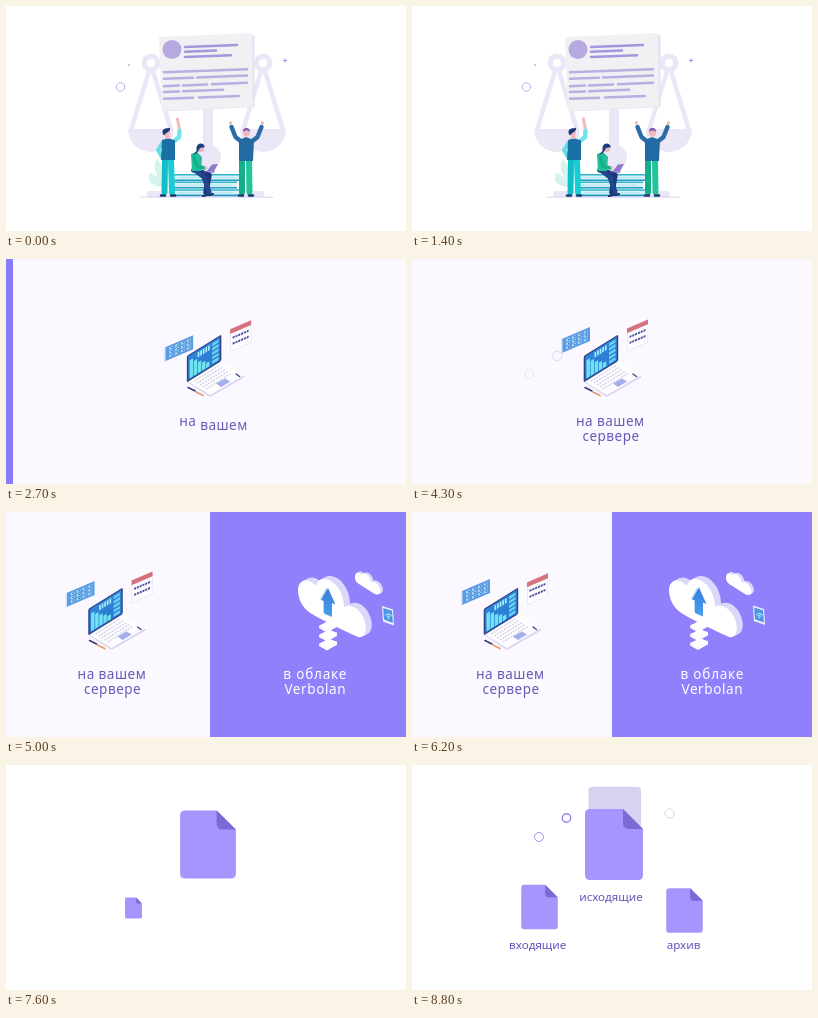
An HTML page with a canvas that plays this animation: 400x225 px, repeating every 8.9 s.

```html
<!DOCTYPE html>
<html lang="ru">
<head>
<meta charset="utf-8">
<title>Документы</title>
<style>
html, body { margin: 0; width: 100%; height: 100%; overflow: hidden; background: #fff; }
canvas { display: block; width: 100vw; height: 100vh; }
</style>
</head>
<body>
<canvas id="stage"></canvas>
<script>
const W = 400, H = 225, LOOP = 8900, STEP = 100;
const canvas = document.getElementById('stage');
const ctx = canvas.getContext('2d');
const FONT = '"Noto Sans", "Open Sans", sans-serif';

const seg = (t, a, b) => Math.min(1, Math.max(0, (t - a) / (b - a)));
const easeInOut = p => p < .5 ? 2 * p * p : 1 - 2 * (1 - p) ** 2;
const slide = (t, a, b) => easeInOut(seg(t, a, b));
const easeOut = p => 1 - (1 - p) ** 3;
const backOut = p => 1 + 2.4 * (p - 1) ** 3 + 1.4 * (p - 1) ** 2;
const wave = (t, period) => Math.sin(t / period * Math.PI * 2);

function rect(x, y, w, h, color, r = 0) {
  ctx.fillStyle = color;
  ctx.beginPath();
  ctx.roundRect(x, y, w, h, r);
  ctx.fill();
}
function poly(color, ...p) {
  ctx.fillStyle = color;
  ctx.beginPath();
  for (let i = 0; i < p.length; i += 2) ctx.lineTo(p[i], p[i + 1]);
  ctx.closePath();
  ctx.fill();
}
function line(color, width, ...p) {
  ctx.strokeStyle = color;
  ctx.lineWidth = width;
  ctx.lineCap = ctx.lineJoin = 'round';
  ctx.beginPath();
  for (let i = 0; i < p.length; i += 2) ctx.lineTo(p[i], p[i + 1]);
  ctx.stroke();
}
function dashes(color, width, on, off, x0, y0, x1, y1) {
  ctx.strokeStyle = color;
  ctx.lineWidth = width;
  ctx.lineCap = 'butt';
  ctx.setLineDash([on, off]);
  ctx.beginPath();
  ctx.moveTo(x0, y0);
  ctx.lineTo(x1, y1);
  ctx.stroke();
  ctx.setLineDash([]);
}
function disc(x, y, r, color) {
  ctx.fillStyle = color;
  ctx.beginPath();
  ctx.arc(x, y, r, 0, 7);
  ctx.fill();
}
function ring(x, y, r, color, width = 1) {
  ctx.strokeStyle = color;
  ctx.lineWidth = width;
  ctx.beginPath();
  ctx.arc(x, y, r, 0, 7);
  ctx.stroke();
}
function shape(d, color) {
  ctx.fillStyle = color;
  ctx.fill(new Path2D(d));
}
function text(str, x, y, color, size, align = 'center', spacing = 0) {
  ctx.font = `${size}px ${FONT}`;
  ctx.letterSpacing = spacing + 'px';
  ctx.textAlign = align;
  ctx.fillStyle = color;
  ctx.fillText(str, x, y);
}
function at(x, y, draw, scale = 1) {
  ctx.save();
  ctx.translate(x, y);
  ctx.scale(scale, scale);
  draw();
  ctx.restore();
}
// Draws on a vertical plane whose horizontal axis climbs by the given slope.
function plane(x, y, slope, draw) {
  ctx.save();
  ctx.transform(1, slope, 0, 1, x, y);
  draw();
  ctx.restore();
}
function gradient(y0, y1, a, b) {
  const g = ctx.createLinearGradient(0, y0, 0, y1);
  g.addColorStop(0, a);
  g.addColorStop(1, b);
  return g;
}

// Scene 1: people under a large document
function drawScales() {
  const c = '#ebe7f7';
  line(c, 6, 145, 57, 257, 57);
  rect(197, 60, 10, 126, c);
  disc(203, 151, 12, c);
  rect(141, 185, 117, 6, c, 2);
  for (const x of [145, 257]) {
    line(c, 4.5, x - 20, 124, x - 1, 62);
    line(c, 4.5, x + 20, 124, x + 1, 62);
    disc(x, 57, 9.5, c);
    disc(x, 57, 4, '#fff');
    ctx.fillStyle = c;
    ctx.beginPath();
    ctx.arc(x, 123, 23, 0, Math.PI);
    ctx.fill();
  }
}
function drawSheet() {
  poly('#e5e0f4', 156, 31, 248.5, 29, 248.5, 101, 159, 105.5);
  poly('#f1f0f3', 153, 31, 246, 27, 247, 100.5, 156, 105);
  disc(166, 43.5, 9.5, '#b6a9e1');
  const row = (x0, x1, y, c = '#baafe3') => line(c, 2.5, x0 + 1, y, x1 - 1, y - (x1 - x0) * .036);
  row(178, 232, 41, '#a597dd');
  row(178, 211, 45.7, '#a597dd');
  row(178, 226, 51, '#a597dd');
  row(157, 242, 66.3);
  row(157, 188, 72.8); row(190, 242, 71.4);
  row(157, 174, 80.2); row(176, 202, 79.4); row(205, 242, 78.2);
  row(157, 174, 86); row(176, 218, 85.2);
  row(157, 188, 92.8); row(192, 234, 91.4);
}
function drawBooks() {
  shape('M156 181 C143 180 141 172 144 167 C148 168 152 171 154 174 C148 166 147 158 151 153 C157 158 160 170 158 181Z', '#d6f4ee');
  for (let i = 0; i < 3; i++) {
    const y = 168 + i * 7.6, x = [168, 165, 167][i];
    rect(x, y, 66, 6.8, '#d7f2f8', 1);
    rect(x, y, 66, 1.5, '#35b4cc');
    rect(x, y + 5.4, 66, 1.6, '#2499bd');
    line('#9eddea', .7, x + 5, y + 3.5, x + 60, y + 3.5);
  }
}
function drawLeftMan(k) {
  line('#12bdca', 6, 159, 155, 158.5, 186);
  line('#1accd4', 6, 165, 155, 166, 186);
  line('#183a74', 2.4, 155, 189.5, 159, 189.5);
  line('#183a74', 2.4, 165, 189.5, 169, 189.5);
  line('#62dfe6', 4, 157, 136, 152, 144, 156, 151);
  const lift = k * 3;
  line('#f3b8bb', 3, 173.5, 124 + lift, 171.5, 113 + lift);
  line('#70e4e8', 4.5, 167, 136, 173, 131 + lift / 2, 173.5, 125 + lift);
  poly('#1b70a6', 156, 134, 162, 132, 169, 134.5, 169, 154, 155, 154);
  rect(159.5, 128, 3.5, 5, '#f0b3b5');
  disc(160.5, 127, 3.3, '#f3b8bb');
  shape('M156.5 127 C156 121 162 123 164 121.5 C165 126 160 126 158 129.5Z', '#193a78');
}
function drawWoman(k) {
  line('#1b3679', 5.5, 188, 164, 203, 169, 200, 186);
  line('#24458d', 5, 189, 164, 198, 171, 203, 186);
  line('#183066', 2.2, 197, 190, 201, 189);
  line('#183066', 2.2, 203, 189, 207, 188);
  poly('#21bf99', 185, 148, 191, 146, 196, 151, 195, 165, 186, 165);
  disc(194.5, 142.5, 3.6, '#f0b3b5');
  shape('M190.5 143 C190 137 197 135 199 141 L194 142 C192 146 190 149 187 148 C190 146 191 145 190.5 143Z', '#1c3c83');
  line('#17ae8c', 3.4, 188, 151, 191, 160, 198, 162 + k * .8);
  disc(200, 162 + k * .8, 1.4, '#f0b3b5');
  poly('#8f78cd', 201, 165, 206, 158.5, 212, 158, 208, 165.5);
  line('#5f4fae', 1, 198, 166, 208, 166);
}
function drawRightMan(k) {
  line('#15ae88', 6, 236, 156, 236, 186);
  line('#22c49a', 6, 243, 156, 243.5, 186);
  line('#183a74', 2.4, 233, 189.5, 237, 189.5);
  line('#183a74', 2.4, 243, 189.5, 247, 189.5);
  const hand = 118 + k * 5, out = k * 3;
  for (const s of [-1, 1]) {
    const x = 240.5;
    disc(x + s * (16 + out), hand - 1, 1.7, '#f3b8bb');
    line('#2a6ba8', 4.4, x + s * 6, 135, x + s * (11 + out), 131 + k * 2, x + s * (15 + out), hand + 3);
  }
  poly('#246aa2', 233, 134, 240, 131, 248, 134, 247, 155, 233, 155);
  disc(240.5, 127, 3.5, '#f3b8bb');
  shape('M236.8 126 C237 120 244 121 244.3 126 C242 124 239 124 236.8 126Z', '#7d5fb4');
}
function peopleScene(t) {
  const k = (1 - Math.cos(t / 1400 * Math.PI * 2)) / 2;
  drawScales();
  at(0, k * 3, drawSheet);
  line('#cbc4e8', .7, 134, 191.2, 267, 191.2);
  drawBooks();
  drawLeftMan(k);
  drawWoman(k);
  drawRightMan(k);
  const drift = wave(t, 2800);
  ring(114.5 + Math.abs(drift), 81 - drift * 2, 4.2, '#a79be6', .8);
  disc(123, 59 + drift * 2, .8, '#8c7be0');
  const px = 279 + Math.abs(drift) * 3, py = 54.5 + drift;
  line('#8c7be0', .8, px - 1.7, py, px + 1.7, py);
  line('#8c7be0', .8, px, py - 1.7, px, py + 1.7);
}

// Scene 2: laptop
function drawLaptop() {
  poly('#d9d6ef', 172, 123, 206, 102, 229, 117, 229, 118.5, 196, 137.5, 194, 137.5);
  poly('#fdfcff', 172, 122, 206, 101, 228.5, 116.5, 195, 136);
  for (let i = 0; i < 5; i++) {
    const x = 179 + i * 3, y = 122 + i * 2;
    dashes('#cfcde2', 1.2, 2, 1, x, y, x + 25, y - 15.5);
  }
  poly('#a3aeea', 201, 124.5, 210, 119.5, 215, 122.5, 206, 128);
  plane(172, 97, -.62, () => {
    rect(-.3, -.3, 34.5, 26.5, '#2f4488', 1.5);
    rect(1.2, 1.2, 31.6, 23.6, gradient(0, 26, '#2f86d8', '#2b78d2'));
    [18, 15, 11, 8, 5].forEach((h, i) => rect(2.5 + i * 4.1, 24 - h, 3.4, h, '#6fe3f2'));
    for (let i = 0; i < 5; i++) rect(10.5 + i * 2.6, 3, 1.7, 5, '#a8effa');
    for (let i = 0; i < 5; i++) rect(25, 3 + i * 4.4, 6.5, 2.9, '#6bd0f2');
  });
  line('#343978', 1.6, 173, 128.5, 180, 132);
  line('#e99a68', 1.8, 181, 133, 188, 136.5);
  line('#3b4080', 1.3, 221, 115, 224.5, 117.5);
}
function drawGridCard() {
  plane(150, 80, -.43, () => {
    rect(-1, 0, 2, 14.5, '#d3e2fa');
    rect(.5, 0, 27.5, 14, '#5b9ae4');
    for (let row = 0; row < 3; row++) {
      dashes('#a3dcf7', 2.4, 4, 1.9, 4, 3.2 + row * 3.8, 26, 3.2 + row * 3.8);
      dashes('#2f66b6', 1.2, 1.5, 4.4, 6, 3.2 + row * 3.8, 26, 3.2 + row * 3.8);
    }
  });
}
function drawListCard() {
  plane(215, 69.5, -.43, () => {
    rect(0, 0, 21, 23, '#e6e3f4');
    rect(.7, 0, 19.7, 22.3, '#fdfcff');
    rect(0, 0, 21, 4.8, '#d4737f');
    for (const y of [9.5, 15.5]) dashes('#4d509e', 2.1, 2, .8, 2.5, y, 18.5, y);
  });
}
function laptopArt(t) {
  const rise = 16 * (1 - easeOut(seg(t, 2560, 3200)));
  drawLaptop();
  at(0, rise + wave(t - 4300, 2600), drawGridCard);
  at(0, rise * .15 - wave(t - 4300, 2800), drawListCard);
  ctx.globalAlpha = seg(t, 3800, 4200) * (1 - seg(t, 4500, 4900));
  ring(145, 97 - wave(t - 4300, 2400), 4.7, '#d9d5ee', .8);
  ring(117.5, 115 + wave(t - 4300, 2400), 4.5, '#e4e0f4', .8);
  ctx.globalAlpha = 1;
}
function risingWord(str, x, y, t, start, align = 'left') {
  const p = seg(t, start, start + 450);
  ctx.globalAlpha = Math.min(1, p * 3);
  text(str, x, y + 20 * (1 - easeOut(p)), '#6959b5', 13.5, align, .5);
  ctx.globalAlpha = 1;
}
function laptopText(t) {
  risingWord('на', 164, 167, t, 2320);
  risingWord('вашем', 185, 167, t, 2520);
  risingWord('сервере', 199, 182, t, 2720, 'center');
}

// Scene 3: cloud
const CLOUD = 'M57 78 C57 70 63 67 68 69 C71 70 73 72 75 74 C76 67 83 65 90 69 C98 74 103 84 103 95 C110 91 119 97 123 107 C127 117 124 127 117 125 C110 122 78 107 68 100 C61 95 57 86 57 78Z';
const CLOUDLET = 'M114 65 C114 60 118 60 120 62.5 C124 60 129 64 130 70 C135 69 139 74 139.5 79 C139 83 136 83 133 81.5 L118 72 C115 70 114 68 114 65Z';
function cloud(d, depth) {
  const slices = 6;
  for (let i = slices; i > 0; i--) {
    at(depth * i / slices, -depth * .5 * i / slices, () => shape(d, '#dad8fb'));
  }
  shape(d, '#fff');
}
function cloudArt(t) {
  const bob = wave(t - 7000, 2000);
  for (let i = 2; i >= 0; i--) {
    const y = 114 + i * 9 + bob * (.4 + i * .3);
    poly('#d5d1fa', 78, y - 1, 96, y - 3, 96, y + 1, 86, y + 6);
    poly('#fff', 78, y, 88, y - 5.5, 96, y - 2, 86, y + 4.5);
    poly('#fff', 86, y + 4.5, 96, y - 2, 96, y + .5, 86, y + 6.5, 78, y + 2, 78, y);
  }
  cloud(CLOUD, 6);
  at(0, bob, () => {
    poly('#b8d8fb', 85, 76, 92, 90, 89, 90, 89, 103, 82, 100, 82, 88, 79, 87);
    poly(gradient(76, 104, '#3b7bdc', '#469fea'), 87, 76, 94.5, 92.5, 91, 91, 91, 105, 83, 101.5, 83, 89, 80, 88);
  });
  at(0, -bob * .7, () => cloud(CLOUDLET, 2.5));
  at(0, bob * .8, () => {
    poly('#eef2ff', 141, 94, 152, 97.5, 153, 113.5, 142, 109.5);
    poly('#4a98e4', 142.2, 96, 151, 98.8, 151.8, 111, 143, 107.6);
    ctx.strokeStyle = '#d2f5ff';
    ctx.lineWidth = 1;
    for (const r of [2, 4]) {
      ctx.beginPath();
      ctx.arc(147.4, 106, r, Math.PI * 1.23, Math.PI * 1.82);
      ctx.stroke();
    }
    disc(147.4, 106, .8, '#d2f5ff');
  });
}
function cloudText() {
  text('в облаке', 100.3, 167, '#fff', 13.5, 'center', .8);
  text('Verbolan', 100.3, 182, '#fff', 13.5, 'center', .6);
}

// Scene 4: folders
function drawDoc() {
  shape('M-24 -35.5 H9 L29 -15.5 V30.5 Q29 35.5 24 35.5 H-24 Q-29 35.5 -29 30.5 V-30.5 Q-29 -35.5 -24 -35.5Z', '#a596fe');
  shape('M9 -35.5 L29 -15.5 H15 Q9 -15.5 9 -21.5Z', '#7b69d5');
}
function folder(t, start, x, y, scale, label, labelX, labelY) {
  const p = seg(t, start, start + 400);
  if (!p) return;
  at(x, y, drawDoc, scale * backOut(p));
  ctx.globalAlpha = seg(t, start + 150, start + 400);
  text(label, labelX, labelY, '#6451bd', 11.6);
  ctx.globalAlpha = 1;
}
function folderScene(t) {
  rect(0, 0, W, H, '#fff');
  const bob = wave(t - 8800, 1600);
  const drop = easeOut(seg(t, 8150, 9000));
  ctx.globalAlpha = seg(t, 8150, 8400);
  rect(176.5, -75 + 98 * drop, 52.5, 64, '#d8d2f1', 4);
  ctx.globalAlpha = 1;
  folder(t, 7450, 202, 79.5, 1, 'исходящие', 199, 136);
  folder(t, 7550, 127.5, 142 + bob, .63, 'входящие', 125.7, 184);
  folder(t, 7650, 272.5, 145.5 - bob, .63, 'архив', 271.5, 184);
  ctx.globalAlpha = seg(t, 7700, 8000);
  ring(127, 72 + bob * 2, 4.5, '#a294f0', 1);
  ring(154.5, 53 - bob * 2, 4.2, '#9585ee', 1.4);
  ring(257.5, 48.5 + bob * 2, 4.6, '#d0cddc', .8);
  ctx.globalAlpha = 1;
}

function drawDiamond(t) {
  const e = slide(t, 6960, 7500);
  if (!e) return;
  const x = 402 - 202 * e, h = 550 * e, y = H / 2;
  poly('#fff', x - h, y, x, y - h, x + h, y, x, y + h);
}

function render(t) {
  rect(0, 0, W, H, '#fff');
  if (t >= 7500) return folderScene(t);

  const push = W * slide(t, 1680, 2420);
  const lightX = W * (1 - slide(t, 1993, 2773));
  const exit = 200 * slide(t, 6385, 7010);
  if (push < W) at(-push, 0, () => peopleScene(t));
  rect(W - push, 0, push, H, '#897dff');
  if (lightX < W) {
    rect(lightX, 0, W - lightX, H, '#fbf8ff');
    const lag = W * (1 - slide(t, 1990, 2785));
    at(lag - 100 * slide(t, 4380, 5185) - exit, 0, () => laptopArt(t));
    at(lag - 100 * slide(t, 4380, 5150) - exit, 0, () => laptopText(t));
  }

  const cloudX = W - 200 * slide(t, 4370, 5070) - exit;
  if (cloudX < W) {
    rect(cloudX, 0, W - cloudX, H, '#9080fc');
    at(400 - 200 * slide(t, 4370, 5111) - exit, 0, cloudText);
    at(400 - 200 * slide(t, 4400, 5252) - exit, 0, () => cloudArt(t));
  }
  if (exit) rect(W - exit, 0, exit, H, '#6752c6');
  drawDiamond(t);
}

function resize() {
  const dpr = window.devicePixelRatio || 1;
  canvas.width = Math.round(innerWidth * dpr);
  canvas.height = Math.round(innerHeight * dpr);
}
addEventListener('resize', resize);
resize();

const begin = performance.now();
function tick() {
  const elapsed = (performance.now() - begin) % LOOP;
  ctx.setTransform(canvas.width / W, 0, 0, canvas.height / H, 0, 0);
  render(Math.floor(elapsed / STEP) * STEP);
  requestAnimationFrame(tick);
}
tick();
</script>
</body>
</html>
```
